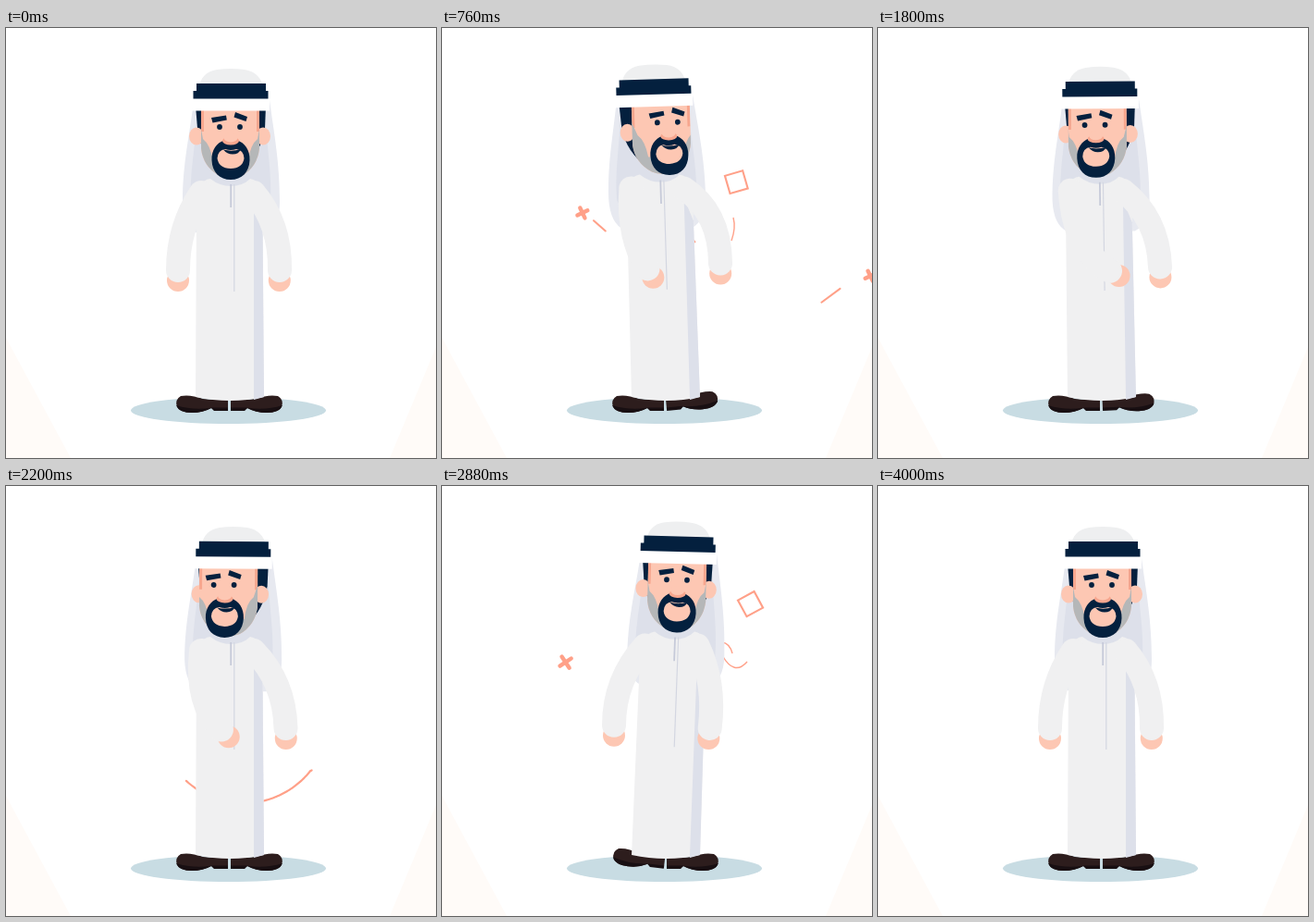
Recreate the animation shown at these times as an HTML page with a canvas. Size 465 by 465 pixels, loop 4040 ms.

```html
<!DOCTYPE html>
<html lang="en">
<head>
<meta charset="utf-8">
<title>Man looking around</title>
<style>
html, body { margin: 0; width: 100%; height: 100%; overflow: hidden; background: #fff; }
canvas { display: block; width: 465px; height: 465px; }
</style>
</head>
<body>
<canvas id="stage" width="465" height="465"></canvas>
<script>
const ctx = document.getElementById('stage').getContext('2d');
const LOOP = 4040, BURST = LOOP / 2;
const CLOTH = '#f0f0f1', SHADE = '#dde0ea', NAVY = '#04203e', SKIN = '#fdc7b3',
      BLUSH = '#f7a68e', CORAL = '#ffa088';

// Progress from 0 to 1 between two times: straight and smoothed
const ramp = (t, a, b) => Math.min(1, Math.max(0, (t - a) / (b - a)));
const ease = (t, a, b) => {
  const u = ramp(t, a, b);
  return u * u * (3 - 2 * u);
};
// Up from a to b, back down from c to d
const swell = (t, a, b, c, d) => ease(t, a, b) - ease(t, c, d);

function poseAt(t) {
  const left = swell(t, 480, 860, 1280, 2200);
  const right = swell(t, 2200, 2800, 3400, 4000);
  const reachL = swell(t, 480, 1000, 1840, 2880);
  const reachR = swell(t, 2700, 3400, 3400, 4000);
  const turn = 15 * ease(t, 480, 760) - 24 * ease(t, 760, 2200) +
    16 * ease(t, 2200, 3400) - 7 * ease(t, 3400, 4000);
  const lift = -5.5 * (left + right);
  return {
    turn, lift,
    lean: 9 * right - 8.5 * left,
    headX: 12 * right - 11 * left - 0.3 * turn,
    armL: {
      wrist: [186 + 65 * reachL, 262 + 0.6 * lift + 2 * reachL],
      elbow: [186 + 26 * reachL, 215 + lift + 28 * reachL]
    },
    armR: {
      wrist: [296 + 9 * reachL - 38 * reachR, 262 - 9 * left],
      elbow: [297 + 6 * reachL - 7 * reachR, 212 - 16 * left + 4 * reachR]
    }
  };
}

function fill(d, color) {
  ctx.fillStyle = color;
  ctx.fill(new Path2D(d));
}

function stroke(d, color, width, cap = 'butt') {
  ctx.strokeStyle = color;
  ctx.lineWidth = width;
  ctx.lineCap = cap;
  ctx.stroke(new Path2D(d));
}

function oval(x, y, rx, ry, color) {
  ctx.fillStyle = color;
  ctx.beginPath();
  ctx.ellipse(x, y, rx, ry, 0, 0, Math.PI * 2);
  ctx.fill();
}

function placed(x, y, deg, draw, sx = 1, sy = sx) {
  ctx.save();
  ctx.translate(x, y);
  ctx.rotate(deg * Math.PI / 180);
  ctx.scale(sx, sy);
  draw();
  ctx.restore();
}

function ground() {
  fill('M0 335L70 465H0Z M465 345L415 465H465Z', '#fffbf8');
  oval(240.5, 413.5, 105.5, 14.5, '#c8dce3');
}

// Arc that runs round the feet and up the right side
function swirl(t) {
  const head = 138 - 178 * (1 - (1 - ramp(t, 40, 454)) ** 2);
  const tail = 138 - 178 * ramp(t, 100, 560) ** 2;
  ctx.beginPath();
  for (let a = tail; a > head; a--) {
    const r = 92 + 36 * Math.sin(Math.max(0, 38 - a) / 78 * Math.PI);
    const k = a * Math.PI / 180;
    ctx.lineTo(257 + r * Math.cos(k), 251 + r * Math.sin(k));
  }
  ctx.strokeStyle = CORAL;
  ctx.lineWidth = 2.2;
  ctx.lineCap = 'round';
  ctx.stroke();
}

function cross(size) {
  stroke(`M${-size} 0H${size}M0 ${-size}V${size}`, CORAL, 4.4, 'round');
}

function star(size) {
  const s = size, c = size * 0.17;
  fill(`M0 ${-s}Q${c} ${-c} ${s} 0Q${c} ${c} 0 ${s}Q${-c} ${c} ${-s} 0Q${-c} ${-c} 0 ${-s}Z`, CORAL);
}

function diamond(gone) {
  if (gone) ctx.setLineDash([6 * (1 - gone), 6]);
  ctx.globalAlpha = 1 - gone;
  ctx.strokeStyle = CORAL;
  ctx.lineWidth = 2.1;
  ctx.strokeRect(-10, -10, 20, 20);
}

function streak(t, x, y, dx, dy) {
  const from = ramp(t, 600, 840), to = ramp(t, 600, 780);
  if (to > from) {
    stroke(`M${x + dx * from} ${y + dy * from}L${x + dx * to} ${y + dy * to}`, CORAL, 2.1, 'round');
  }
}

function wisp(t, from, to, d) {
  if (t >= from && t < to) stroke(d, CORAL, 1.4);
}

function burst(t) {
  swirl(t);
  if (t < 570 || t > 1480) return;
  const out = 1 - Math.exp((560 - t) / 180), rest = 1 - out;
  const fly = (x0, y0, x1, y1, deg, draw) =>
    placed(x0 + (x1 - x0) * out, y0 + (y1 - y0) * out, deg, draw);

  fly(240, 245, 109, 178, 45 + 60 * rest, () =>
    t < 1340 ? cross(9 * out) : star(11 * (1 - ramp(t, 1340, 1480))));
  fly(250, 250, 567, 277, 45 + 60 * rest, () => cross(9 * out));
  fly(245, 355, 354, 75, -45 + 88 * rest, () => diamond(ramp(t, 1320, 1430)));
  streak(t, 350, 341, 90, -66);
  streak(t, 215, 253, -57, -50);
  wisp(t, 680, 810, 'M315 205Q318 216 313 230M272 229L274 232');
  wisp(t, 810, 960, 'M303 169Q311 170 314 181M303 183Q316 206 330 190');
  wisp(t, 960, 1310, 'M340.5 137V143.5');
}

function shoe(deg, flip) {
  placed(flip ? 242 : 241, 412, deg, () => {
    fill('M-1-11Q-15-9-28-11Q-42-16-52-14Q-59-10-56-2Q-52 4-40 4Q-28 4-19-1L-16 1H-1Z', '#2d1d1d');
    fill('M-57-4Q-54 4-40 4Q-28 4-19-1L-16 2H-1V-1.5H-18Q-38 2-57-4Z', '#180f12');
  }, flip ? -1 : 1, 1);
}

// Draws in upright coordinates around the head's pivot
function headSpace({ headX, lift }, draw) {
  placed(243 + headX, 89 + lift, headX * 0.12, () => {
    ctx.translate(-243, -89);
    draw();
  });
}

function veil() {
  fill('M203 78C199 115 191 145 191 188Q192 215 207 222H280Q296 214 296 188C296 145 290 115 285 78Z', '#e7e9f0');
  fill('M207 85C206 125 198 155 200 190L214 215H272L286 190C288 155 281 125 280 85Z', SHADE);
}

function robe({ lean, lift }) {
  ctx.save();
  const k = 1 / 235;
  ctx.transform(1, 0, -lean * k, 1 - lift * k, lean * 400 * k, lift * 400 * k);
  fill('M205 399L206 190Q206 165 221 163Q231 171 243 171Q256 171 264 163Q279 166 277.5 190L279 399Q243 407 205 399Z', CLOTH);
  fill('M268 188L277.5 212L279 399L268 402Z', SHADE);
  stroke('M243.2 169V194', '#c6cad9', 1.8);
  stroke('M246.8 169V285', '#d3d6e1', 1.2);
  ctx.restore();
}

function arm(x, y, { wrist, elbow }) {
  const dx = wrist[0] - elbow[0], dy = wrist[1] - elbow[1];
  const k = 11 / Math.hypot(dx, dy);
  oval(wrist[0] + dx * k, wrist[1] + dy * k, 12, 12, SKIN);
  stroke(`M${x} ${y}Q${elbow} ${wrist}`, CLOTH, 26, 'round');
}

function face(turn) {
  const shape = 'M211 84V130Q213 150 231 160Q243 165 255 160Q272 150 274 130V84Z';
  const x = turn * 0.25;
  ctx.save();
  ctx.translate(turn * 0.5, 0);
  fill(shape, SKIN);
  ctx.clip(new Path2D(shape));
  fill('M211 84H214V112H211ZM271 84H274V112H271Z', BLUSH);
  fill(`M210 104L${213 + x} 120Q${221 + x} 126 ${224 + x} 144H${262 + x}Q${264 + x} 126 ${272 + x} 120L275 104V170H210Z`, '#b5b7b8');
  ctx.restore();
}

function features() {
  fill('M222.5 143C222 132 228 124 236 121.5Q243 125 250 121.5C258 124 264 132 263.5 143C263 156 255 164 243 164C231 164 223 156 222.5 143Z', NAVY);
  fill('M228.5 141Q229 132 237 131Q243 133 249 131Q257 132 257.5 141Q256 151.5 243 152Q230 151.5 228.5 141Z', SKIN);
  fill('M235 131.5Q244 134 254 131Q252 136.5 245 136.5Q239 136.5 235 131.5Z', NAVY);
  oval(243, 122, 9, 4.5, BLUSH);
  oval(243, 118.5, 7.5, 5, SKIN);
  oval(231, 107, 2.9, 3, NAVY);
  oval(253, 107, 2.9, 3, NAVY);
  fill('M222 97L238 94.5L238.8 99.5L223.5 102.5Z M248 91L261 96L259.5 101L246.5 96.5Z', NAVY);
}

function head(turn) {
  const tuck = Math.abs(turn) * 0.5;
  fill('M205 84L207 108Q209 132 228 150H258Q277 132 280 108L281 84Z', NAVY);
  oval(206 + Math.max(0, turn) * 0.5, 117, 8, 9.5, SKIN);
  oval(278 - tuck, 117, 8, 9.5, SKIN);
  face(turn);
  placed(turn, 0, 0, features);

  fill('M209 64Q211 48 228 45Q243 43 258 45Q275 48 278 64Z', '#eeeff0');
  fill('M202 75H285V89.5H201Z', '#fff');
  fill('M206 60H281V68H283.5V76.5H202.5V68H206Z', NAVY);
}

function man(p) {
  shoe(Math.max(0, p.lean) * 0.75, false);
  shoe(Math.min(0, p.lean) * 0.75, true);
  headSpace(p, veil);
  robe(p);
  const dx = p.lean * 0.94, y = 178 + p.lift;
  arm(211 + dx, y, p.armL);
  arm(268 + dx, y, p.armR);
  headSpace(p, () => head(p.turn));
}

function frame() {
  const t = performance.now() % LOOP;
  ctx.clearRect(0, 0, 465, 465);
  ground();
  burst(t % BURST);
  man(poseAt(t));
  requestAnimationFrame(frame);
}
frame();
</script>
</body>
</html>
```
